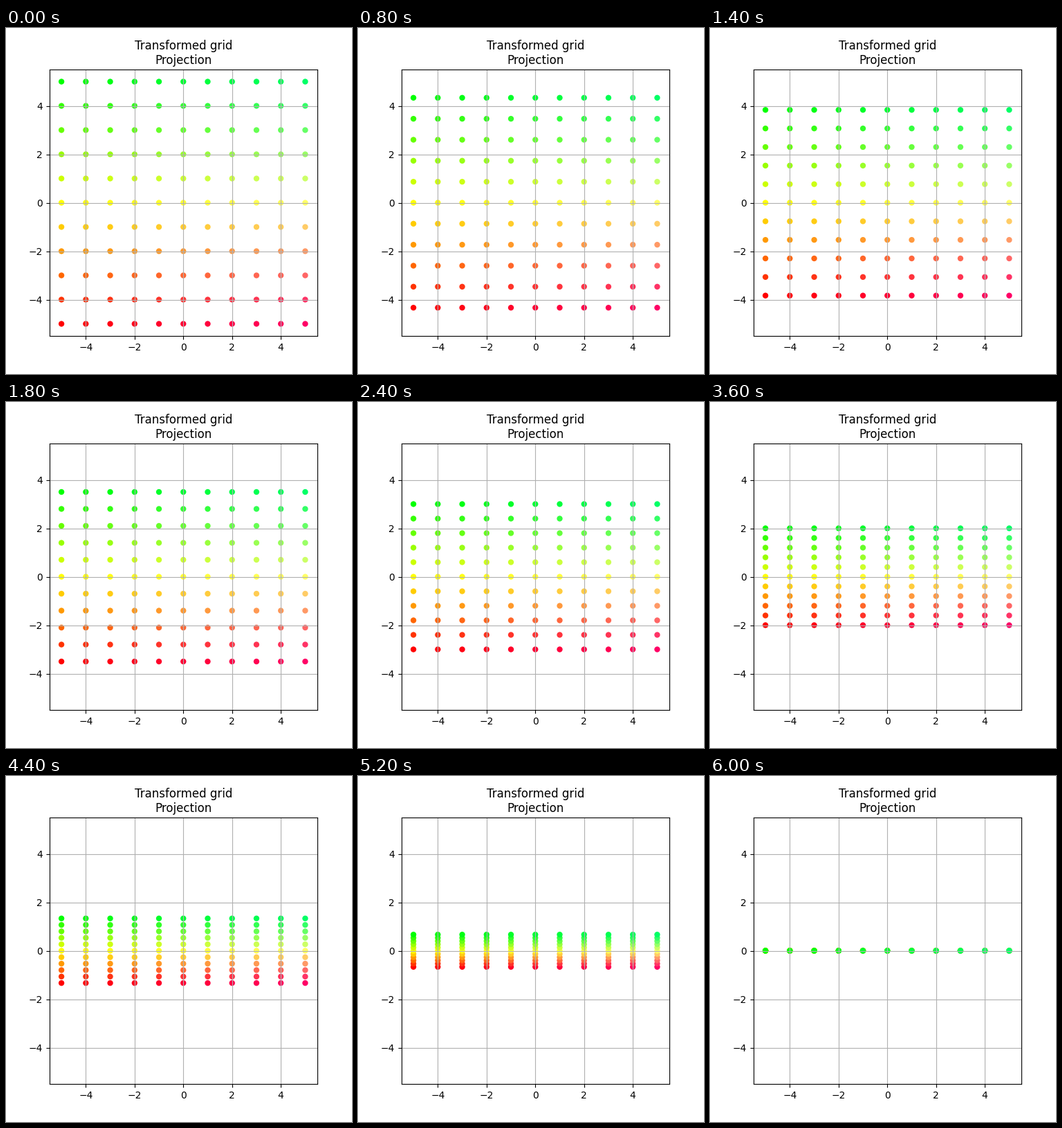
A matplotlib script for the animation above (6.2 s loop, 500 by 500 pixels).

```python
import numpy as np
import matplotlib.pyplot as plt
from matplotlib.animation import FuncAnimation

STEPS = 30
INTERVAL = 200  # ms
HALF = 5


def dot_color(x, y):
    """Red to green along y, with blue rising along x."""
    return min(1, 1 - y / HALF), min(1, 1 + y / HALF), 0.2 + x / 25


values = np.arange(-HALF, HALF + 1)
grid = np.array([(x, y) for y in values for x in values], dtype=float)
colors = [dot_color(x, y) for x, y in grid]

projection = np.array([[1, 0], [0, 0]])

fig, ax = plt.subplots(figsize=(5, 5), dpi=100)
dots = ax.scatter(grid[:, 0], grid[:, 1], s=36, c=colors, edgecolor="none")
ax.set(xlim=(-5.5, 5.5), ylim=(-5.5, 5.5),
       xticks=range(-4, 5, 2), yticks=range(-4, 5, 2))
ax.grid(True)
ax.set_title("Transformed grid\nProjection")


def update(step):
    """Blend linearly from the identity to the projection."""
    t = step / STEPS
    matrix = (1 - t) * np.eye(2) + t * projection
    dots.set_offsets(grid @ matrix.T)
    return (dots,)


anim = FuncAnimation(fig, update, frames=STEPS + 1, interval=INTERVAL,
                     repeat=True, repeat_delay=0)
plt.show()
```
